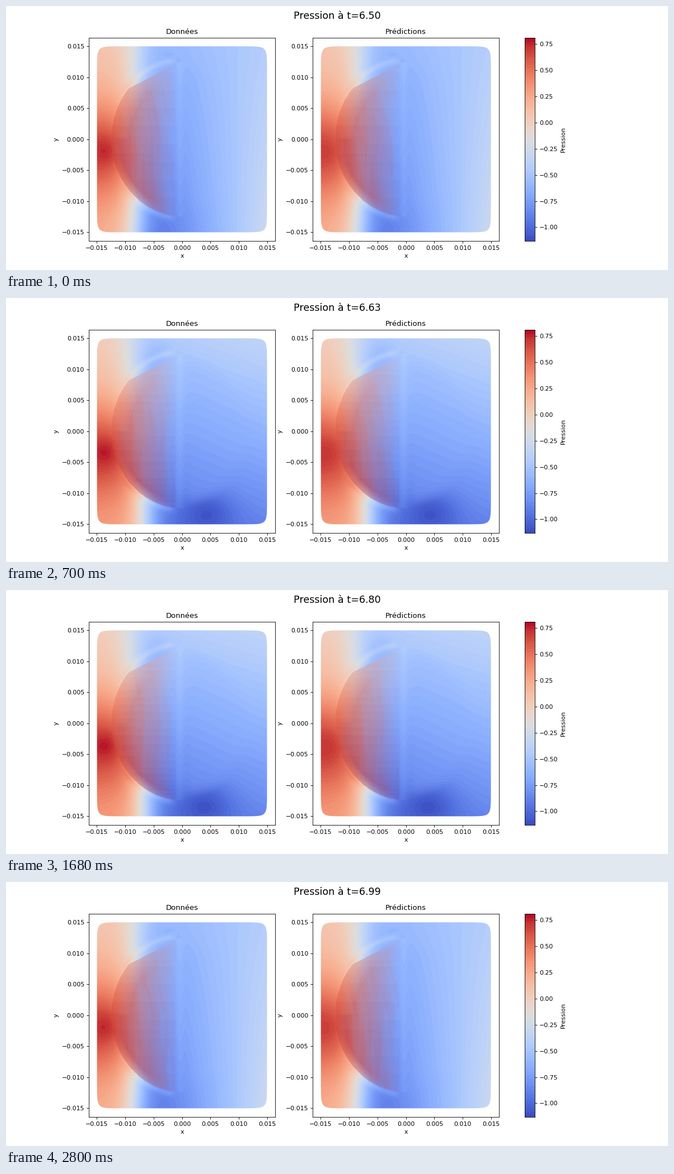
Animation of 1183 by 473 pixels, one loop 2940 ms. Source, as a matplotlib script:

```python
import numpy as np
import matplotlib.pyplot as plt
from matplotlib.animation import FuncAnimation
from matplotlib.patches import Polygon

W, H = 1183, 473
FRAMES, STEP_MS = 21, 140
NX, NY = 333, 364            # pixels inside one panel
LIM = 16.4                   # half width of a panel, in thousandths
R = 12.4                     # radius of the obstacle
P_MIN, P_MAX, BANDS = -1.131, 0.811, 80
TAU = 2 * np.pi

plt.rcParams.update({
    "font.family": "DejaVu Sans", "font.size": 9.86,
    "axes.titlesize": 11.83, "axes.labelsize": 9.86,
    "xtick.labelsize": 9.86, "ytick.labelsize": 9.86,
    "axes.linewidth": 0.79,
})
cmap = plt.get_cmap("coolwarm")

px = ((np.arange(NX) + .5) / NX * 2 - 1) * LIM
py = (1 - (np.arange(NY) + .5) / NY * 2) * LIM
X, Y = np.meshgrid(px, py)
RAD = np.hypot(X, Y)

# Downstream half of the obstacle: values are drawn towards the axis.
depth = np.clip((R - RAD) / 2.5, 0, 1) * np.clip((X + 1) / 3, 0, 1)
Y_IN = Y * (1 - .2 * depth)

# Thin pale layers: along the upstream rim and behind the flat face.
SHEET = (.1 * np.exp(-((RAD - 12.7) / .5)**2)
         * np.clip((-X - .8) / 1.5, 0, 1) * np.clip((np.abs(Y) - 7) / 2, 0, 1)
         + .04 * np.exp(-((X + .4) / .6)**2) * (RAD < R))

# Upstream half: a lens of translucent shards, from warm to cool.
along = np.clip((X + R) / (R - 1), 0, 1)
arc = -np.sqrt(np.maximum(R**2 - Y**2, 1.5))
across = np.clip((X - arc) / (-1 - arc), 0, 1)
MIX = .55 * along + .45 * across
CUT = np.abs(Y) < 8.2 + .47 * (X + 9.3)
strips = (X + 17 + .1 * np.abs(Y)) / .95
STRIP = strips.astype(int)
CELL = ((Y + 24 + 1.7 * (STRIP % 3) + 4 * (strips - STRIP)) / 4.2).astype(int)


def cycle(frame):
    """Place in the shedding cycle, eased around its quarters."""
    c = .85 * frame % 1
    return c + .05 * np.sin(2 * TAU * c)


def bump(x, y, x0, y0, sx, sy):
    return np.exp(-((x - x0) / sx)**2 - ((y - y0) / sy)**2)


def upstream(y, c):
    """Pressure on the inflow side, highest at the moving stagnation point."""
    swing = np.sin(TAU * (c + .08))
    return (.15 - .14 * y / 15 * swing
            + .52 * np.exp(-((y + 3.7 * swing) / 8)**2))


def wake(x, y, c):
    """Pressure downstream, a wave travelling with the vortices."""
    u, v = x / 15, y / 15
    p = (-.70 + .22 * u + .13 * u * np.cos(2 * TAU * c)
         + v * (.27 * np.sin(TAU * c) + (.12 - .19 * u) * np.cos(TAU * c)))
    for side, phase in ((-1, c % 1), (1, (c + .5) % 1)):
        power = max(0, np.sin(TAU * phase))
        p = p - .18 * power * bump(x, y, .5 + 16 * phase, 13 * side, 4.5, 3.2)
        p = p - .10 * power * bump(x, y, -5, -11 * side, 3, 3.5)
    return p


def field(x, y, c):
    centre = -7.8 - 1.4 * np.sin(TAU * c) * y / 15
    s = 1 / (1 + np.exp(-(x - centre) / 1.5))
    return (1 - s) * upstream(y, c) + s * wake(x, y, c)


def colours(p):
    u = (np.clip(p, P_MIN, P_MAX - 1e-6) - P_MIN) / (P_MAX - P_MIN)
    return cmap((np.floor(u * BANDS) + .5) / BANDS)[..., :3]


def panel(frame, predicted):
    c = cycle(frame)
    swing = np.sin(TAU * (c + .08))
    p = field(X, Y_IN, c) + SHEET
    p = p + (.03 if predicted else .1) * bump(X, Y, -13.2, -3.7 * swing, 2.5, 2.5)
    img = colours(p)

    rng = np.random.default_rng(100 + frame + 50 * predicted)
    grain = rng.uniform(-.05, .05, (40, 40))[CELL, STRIP]
    mix = np.clip(MIX + grain, 0, 1)[..., None]
    veil = ((1 - mix) * colours(upstream(.35 * Y, c))
            + mix * colours(wake(-.5, Y, c)))

    far = Y * swing > 0
    lens = (RAD < R) & (X < -1.1) & (CUT | ~far)
    rim = np.clip((R - RAD) / np.where(far, 3, 1.3), 0, 1)
    alpha = lens * (.45 + .45 * np.floor(rim * 6) / 6) * (.92 + .08 * swing)
    alpha = alpha[..., None]
    return (1 - alpha) * img + alpha * veil


fig = plt.figure(figsize=(14.7875, 5.9125), dpi=80, facecolor="white")
title = fig.suptitle("", fontsize=15.77, y=.98)


def add_axes(x, w):
    return fig.add_axes([x / W, 52 / H, w / W, 364.3 / H])


# The sampled region is a square with slightly rounded sides.
a = np.linspace(0, TAU, 400)
rounded = [np.sign(f) * np.abs(f)**(1 / 11) for f in (np.cos(a), np.sin(a))]
OUTLINE = np.column_stack(rounded) * (.01495, .015)

edge = LIM / 1000
images = []
for left, name in ((147.9, "Données"), (548, "Prédictions")):
    ax = add_axes(left, 333.3)
    im = ax.imshow(np.ones((NY, NX, 3)), extent=(-edge, edge, -edge, edge),
                   aspect="auto", interpolation="nearest")
    shape = Polygon(OUTLINE, fc="none", ec="none", transform=ax.transData)
    ax.add_patch(shape)
    im.set_clip_path(shape)
    ax.set(title=name, xlabel="x", ylabel="y",
           xlim=(-edge, edge), ylim=(-edge, edge))
    ax.set_xticks(np.arange(-3, 4) * .005)
    ax.set_yticks(np.arange(-3, 4) * .005)
    images.append(im)

bar = add_axes(927.3, 18)
ramp = P_MAX - (np.arange(NY) + .5) / NY * (P_MAX - P_MIN)
bar.imshow(colours(ramp)[:, None, :], extent=(0, 1, P_MIN, P_MAX),
           aspect="auto", interpolation="nearest")
bar.set_xticks([])
bar.yaxis.tick_right()
bar.yaxis.set_label_position("right")
bar.set_yticks(np.arange(-4, 4) * .25)
bar.set_ylabel("Pression")


def update(frame):
    title.set_text(f"Pression à t={6.5026 + .0245 * frame:.2f}")
    for k, im in enumerate(images):
        im.set_data(panel(frame, k == 1))
    return [title, *images]


anim = FuncAnimation(fig, update, frames=FRAMES, interval=STEP_MS,
                     init_func=lambda: update(0), repeat=True,
                     repeat_delay=0, blit=False)
plt.show()
```
